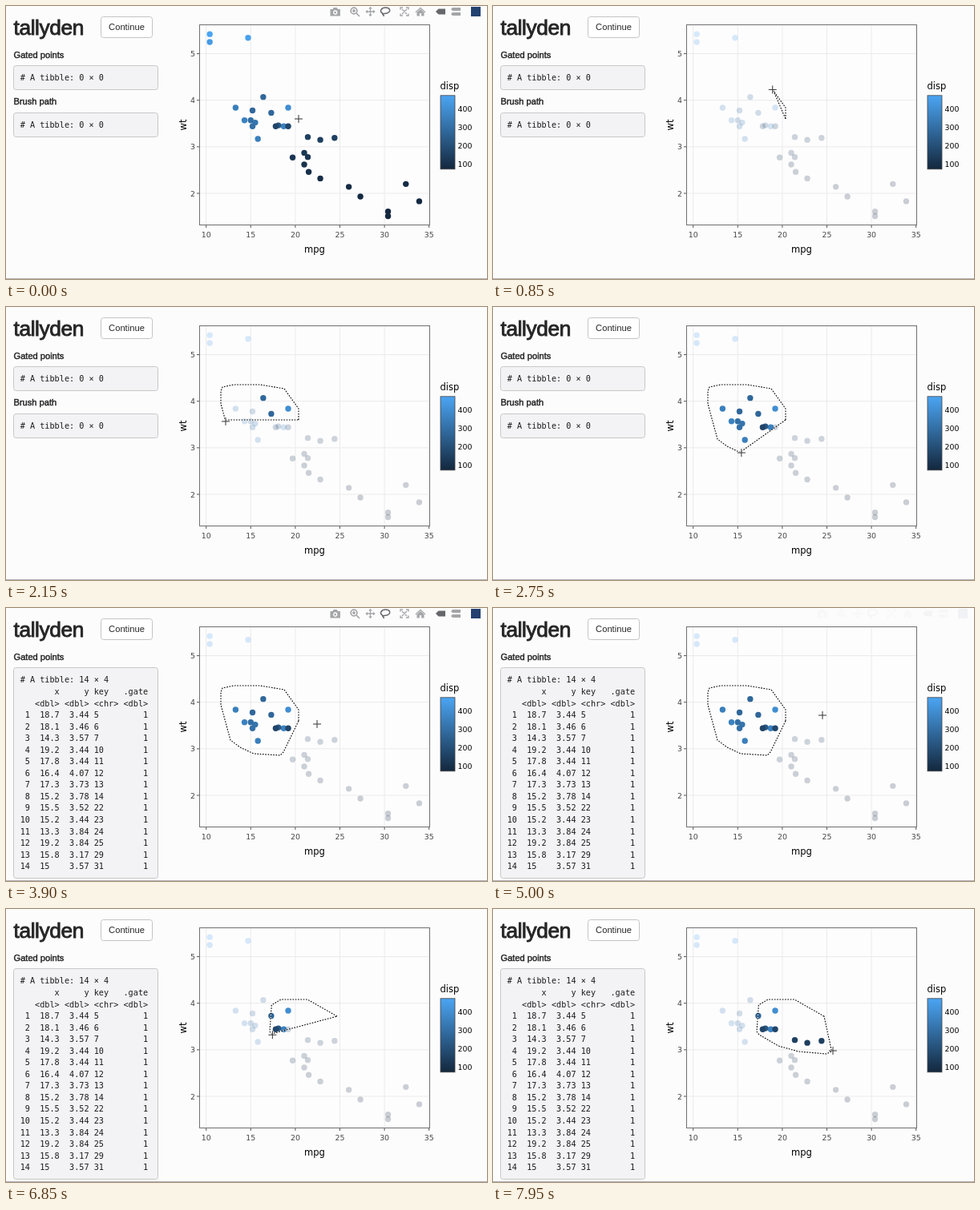
Animation of 600 by 341 pixels, one loop 8 s. Source, as an HTML page:

```html
<!DOCTYPE html>
<html lang="en">
<head>
<meta charset="utf-8">
<title>Lasso gating</title>
<style>
html, body { margin: 0; width: 100%; height: 100%; overflow: hidden; background: #fdfcfd; }
svg { display: block; width: 100vw; height: 100vh; }
text { white-space: pre; }
.ui { font-family: "Liberation Sans", Arial, sans-serif; fill: #262626; }
.head { font-size: 11.1px; stroke: #262626; stroke-width: .45px; }
.mono { font-family: "DejaVu Sans Mono", Menlo, monospace; font-size: 10.2px; fill: #1c1c1c; }
.axis { font-family: "DejaVu Sans", Verdana, sans-serif; font-size: 9.4px; fill: #444; }
.key { fill: #000; }
.label { font-family: "DejaVu Sans", Verdana, sans-serif; font-size: 11.5px; fill: #000; }
.pre { fill: #f3f2f4; stroke: #c8c8c8; }
</style>
</head>
<body>
<svg id="stage" viewBox="0 0 600 341">
  <defs>
    <linearGradient id="ramp" x1="0" y1="1" x2="0" y2="0">
      <stop offset="0" stop-color="#13273d"/>
      <stop offset="1" stop-color="#4ba5f3"/>
    </linearGradient>
  </defs>
  <rect width="600" height="341" fill="#fdfcfd"/>

  <text class="ui" x="9.5" y="36" font-size="26.3" letter-spacing="-.4" stroke="#262626" stroke-width=".9">tallyden</text>
  <rect x="118.5" y="13.5" width="64" height="26" rx="3" fill="#fff" stroke="#c4c4c4"/>
  <text class="ui" x="150.5" y="30.3" font-size="11.2" text-anchor="middle">Continue</text>
  <text class="ui head" x="9.5" y="65">Gated points</text>
  <g id="empty">
    <rect class="pre" x="9.5" y="74.5" width="180" height="30" rx="3"/>
    <text class="mono" x="17.7" y="93.4"># A tibble: 0 × 0</text>
    <text class="ui head" x="9.5" y="123">Brush path</text>
    <rect class="pre" x="9.5" y="133.5" width="180" height="30" rx="3"/>
    <text class="mono" x="17.7" y="152.2"># A tibble: 0 × 0</text>
  </g>
  <g id="table">
    <rect class="pre" x="9.5" y="74.5" width="180" height="263" rx="3"/>
  </g>

  <rect x="241.5" y="23.5" width="287" height="250" fill="#fefdfe"/>
  <g id="axes"></g>
  <rect x="241.5" y="23.5" width="287" height="250" fill="none" stroke="#707070"/>
  <text class="label" x="385" y="308" text-anchor="middle">mpg</text>
  <text class="label" transform="translate(225 148.500) rotate(-90)" text-anchor="middle">wt</text>
  <text class="label" x="541.5" y="104">disp</text>
  <rect x="542" y="111.800" width="18" height="92" fill="url(#ramp)" stroke="#444" stroke-width=".8"/>
  <g id="dots"></g>

  <g fill="none" stroke-linejoin="round">
    <path id="halo" stroke="#fff"/>
    <path id="lasso" stroke="#000" stroke-width="1.100" stroke-dasharray="1.700 1.600"/>
  </g>

  <g id="bar" fill="#a4a5a8">
    <path fill-rule="evenodd" d="M404.500 4h3l1.200-2h4l1.200 2h3v8.500h-12.400zM410.700 5.300a2.800 2.800 0 1 0 .1 0zM410.700 6.700a1.400 1.400 0 1 1-.1 0z"/>
    <g fill="none" stroke="#a4a5a8" stroke-width="1.700">
      <circle cx="434" cy="6" r="3.900"/>
      <path d="M437 9l4 4M432 6h4M434 4v4"/>
      <path stroke-width="1.300" d="M449.500 7h10M454.500 2v10"/>
      <path stroke="#66676b" stroke-width="1.500" d="M470 9.200C465 7 468 2 473.500 2S481 7 475 9c-3 .8-6 0-5 1.500s2 .5 1 2.500"/>
      <path stroke-width="1.400" d="M492 4.500V2h3M499 2h3v2.500M502 9.500V12h-3M495 12h-3V9.500M494 4l6 6M500 4l-6 6"/>
    </g>
    <path d="M454.500 .8l2.300 2.700h-4.600zM454.500 13.200l2.300-2.700h-4.600zM448.300 7l2.700-2.300v4.600zM460.700 7l-2.700-2.300v4.600z"/>
    <path d="M510.500 7.500l6.500-6 6.500 6-.8 1-5.700-5.200-5.700 5.200zM512.500 8l4.500-4 4.500 4v4.500h-3.300V9h-2.400v3.500h-3.300z"/>
    <path fill="#66676b" d="M536 7l3.500-3.500h8.500v7h-8.500z"/>
    <path d="M555 4l2-2h10v4h-10zM555 10l2-2h10v4h-10z"/>
    <rect x="580" y="1" width="12" height="12" fill="#24416f"/>
  </g>

  <g id="cursor" fill="none">
    <path d="M-5 0H5M0-5V5" stroke="#fff" stroke-width="2.200" opacity=".7"/>
    <path d="M-5 0H5M0-5V5" stroke="#333"/>
  </g>
  <path d="M0 340.500H600" stroke="#b0b0b2"/>
</svg>
<script>
const LOOP = 8000;
const LAG = 20;     // outline trails the cursor
const PULSE = 273;  // the selection refreshes in steps
const TABLE_AT = 3520;

const $ = id => document.getElementById(id);

function add(parent, tag, attrs, text) {
  const el = document.createElementNS("http://www.w3.org/2000/svg", tag);
  for (const k in attrs) el.setAttribute(k, attrs[k]);
  if (text !== undefined) el.textContent = text;
  return parent.appendChild(el);
}

const clamp = v => Math.min(1, Math.max(0, v));
const px = mpg => 249.7 + (mpg - 10) * 11.12;
const py = wt => 234 - (wt - 2) * 58.15;

// Rows of the printed table: mpg, wt, key, disp
const gated = [
  [18.7, 3.44, 5, 360], [18.1, 3.46, 6, 225], [14.3, 3.57, 7, 360], [19.2, 3.44, 10, 168],
  [17.8, 3.44, 11, 168], [16.4, 4.07, 12, 276], [17.3, 3.73, 13, 276], [15.2, 3.78, 14, 276],
  [15.5, 3.52, 22, 318], [15.2, 3.44, 23, 304], [13.3, 3.84, 24, 350], [19.2, 3.84, 25, 400],
  [15.8, 3.17, 29, 351], [15, 3.57, 31, 301]
];
// Remaining cars: mpg, wt; disp follows from the weight
const others = [
  [10.4, 5.25], [10.4, 5.42], [14.7, 5.34], [19.7, 2.77], [21, 2.62], [21, 2.87],
  [21.4, 3.21], [21.4, 2.78], [21.5, 2.46], [22.8, 2.32], [22.8, 3.15], [24.4, 3.19],
  [26, 2.14], [27.3, 1.93], [30.4, 1.61], [30.4, 1.51], [32.4, 2.2], [33.9, 1.83]
];
const dispOf = wt => 75 + 26 * (wt - 1.5) ** 2;

// Cursor legs, each walked at constant speed
const legs = [
  { from: 415, to: 3145, lasso: true, pts: [[365, 141], [365, 127], [347, 102], [317, 97], [284, 97],
    [270, 100], [268, 105], [268, 121], [280, 165], [292, 174], [309, 182], [342, 184], [346, 180]] },
  { from: 3300, to: 3900, pts: [[346, 180], [388, 145]] },
  { from: 3900, to: 5000, pts: [[388, 145], [411, 134]] },
  { from: 5410, to: 7950, lasso: true, pts: [[413, 134], [376, 113], [343, 113], [331.3, 120],
    [329, 153], [332, 157], [356, 171], [381, 178], [416, 181], [424, 177]] }
];

// The part of a leg walked until time t
function trail({ from, to, pts }, t) {
  const gap = i => Math.hypot(pts[i][0] - pts[i - 1][0], pts[i][1] - pts[i - 1][1]);
  let total = 0;
  for (let i = 1; i < pts.length; i++) total += gap(i);
  let left = total * clamp((t - from) / (to - from));
  const out = [pts[0]];
  for (let i = 1; i < pts.length && left > 0; i++) {
    const k = Math.min(1, left / gap(i));
    out.push(pts[i].map((v, j) => pts[i - 1][j] + (v - pts[i - 1][j]) * k));
    left -= gap(i);
  }
  return out;
}

const lastLeg = (list, t) => list.filter(l => t >= l.from).pop();
const strokes = legs.filter(l => l.lasso);

function inside([x, y], poly) {
  let hit = false;
  poly.forEach(([ax, ay], i) => {
    const [bx, by] = poly[(i + 1) % poly.length];
    if (ay > y !== by > y && x < ax + (bx - ax) * (y - ay) / (by - ay)) hit = !hit;
  });
  return hit;
}

// The toolbar hides while dragging
function barOpacity(t) {
  const ramp = at => {
    const k = clamp((t - at) / 300);
    return k * k * (3 - 2 * k);
  };
  return 1 - ramp(400) + ramp(3280) - ramp(4740);
}

function shade(disp) {
  const k = (disp - 71) / 401;
  const mix = (a, b) => Math.round(a + (b - a) * k);
  return `rgb(${mix(19, 75)},${mix(39, 165)},${mix(61, 243)})`;
}

function buildAxes() {
  const g = $("axes"), line = (d, stroke) => add(g, "path", { d, stroke });
  for (let v = 10; v <= 35; v += 5) {
    const x = px(v);
    if (v < 35) line(`M${x} 24V273`, "#ebebeb");
    line(`M${x} 274v3`, "#555");
    add(g, "text", { class: "axis", x, y: 289, "text-anchor": "middle" }, v);
  }
  for (let v = 2; v <= 5; v++) {
    const y = py(v);
    line(`M242 ${y}H528`, "#ebebeb");
    line(`M238 ${y}h3`, "#555");
    add(g, "text", { class: "axis", x: 236, y: y + 3.5, "text-anchor": "end" }, v);
  }
  for (let v = 100; v <= 400; v += 100)
    add(g, "text", { class: "axis key", x: 563.5, y: 207.4 - (v - 71) / 401 * 92 }, v);
}

function buildTable() {
  const rows = gated.map(([mpg, wt, key], i) => [
    String(i + 1).padStart(2),
    String(mpg).padEnd(4).padStart(5),
    wt.toFixed(2).padStart(5),
    String(key).padEnd(5),
    "1".padStart(5)
  ].join(" "));
  ["# A tibble: 14 × 4", "       x     y key   .gate", "   <dbl> <dbl> <chr> <dbl>", ...rows]
    .forEach((s, i) => add($("table"), "text", { class: "mono", x: 17.7, y: 93.4 + i * 14.55 }, s));
}

buildAxes();
buildTable();
const dots = [...gated, ...others].map(([mpg, wt, , disp = dispOf(wt)]) => {
  const at = [px(mpg), py(wt)];
  return { at, el: add($("dots"), "circle", { cx: at[0], cy: at[1], r: 3.7, fill: shade(disp) }) };
});

function draw(t) {
  const stroke = lastLeg(strokes, t);
  const d = stroke ? "M" + trail(stroke, t - LAG).map(p => p.join(" ")).join("L") + "Z" : "";
  $("halo").setAttribute("d", d);
  $("lasso").setAttribute("d", d);

  const area = stroke && trail(stroke, Math.floor(t / PULSE) * PULSE);
  for (const { at, el } of dots)
    el.setAttribute("opacity", !area || inside(at, area) ? 1 : 0.22);

  const [x, y] = trail(lastLeg(legs, t) || legs[0], t).pop();
  $("cursor").setAttribute("transform", `translate(${x} ${y})`);
  $("bar").setAttribute("opacity", barOpacity(t));
  $("empty").style.display = t < TABLE_AT ? "" : "none";
  $("table").style.display = t < TABLE_AT ? "none" : "";
}

const start = performance.now();
function tick(now) {
  draw(Math.max(0, now - start) % LOOP);
  requestAnimationFrame(tick);
}
draw(0);
requestAnimationFrame(tick);
</script>
</body>
</html>
```
